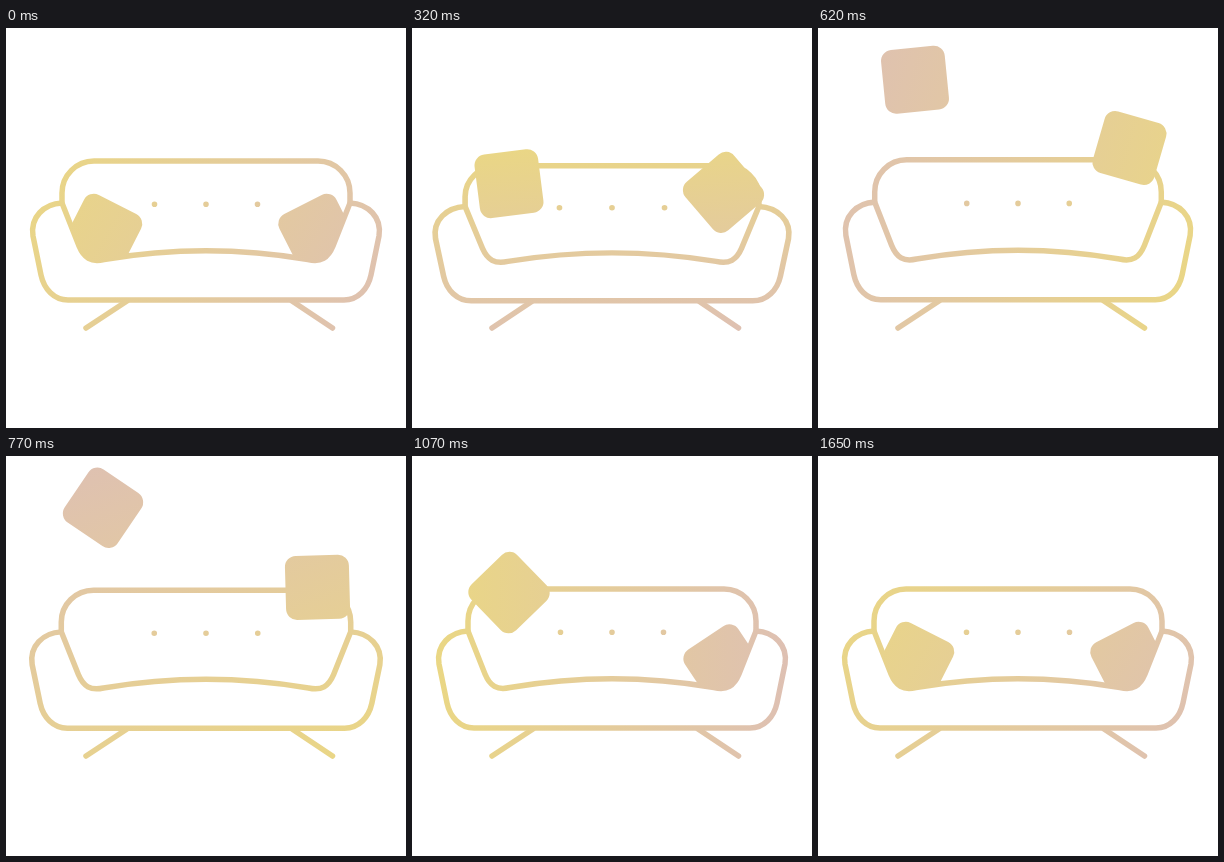
Animation of 400 by 400 pixels, one loop 1.67 s. Source, as an HTML page:

```html
<!DOCTYPE html>
<html lang="en">
<head>
<meta charset="utf-8">
<title>Sofa</title>
<style>
  html, body { margin: 0; width: 100%; height: 100%; overflow: hidden; background: #fff; }
  svg { display: block; width: 100%; height: 100%; }
</style>
</head>
<body>
<svg viewBox="0 0 400 400">
  <defs>
    <linearGradient id="tint" gradientUnits="userSpaceOnUse">
      <stop offset="0" stop-color="#ead784"/>
      <stop offset="1" stop-color="#dec0b3"/>
    </linearGradient>
    <mask id="shape" maskUnits="userSpaceOnUse" x="0" y="0" width="400" height="400">
      <g fill="none" stroke="#fff" stroke-width="5.5" stroke-linecap="round" stroke-linejoin="round">
        <path id="legs"/>
        <g class="sofa">
          <path d="M56 174V165A32 32 0 0 1 88 133H312A32 32 0 0 1 344 165V174"/>
          <path stroke-width="5.6" d="M148.5 176.3h0M200 176.3h0M251.5 176.3h0"/>
        </g>
        <g fill="#fff" stroke="none">
          <rect id="left" x="-32" y="-32" width="64" height="64" rx="11"/>
          <rect id="right" x="-32" y="-32" width="64" height="64" rx="11"/>
        </g>
        <path class="sofa" fill="#000" d="M56 175C38 176 24 189 27 208L35 247C38 261 48 272 62 272H338C352 272 362 261 365 247L373 208C376 189 362 176 344 175L327 218C322 230 315 234.5 302 231.5Q200 214 98 231.5C85 234.5 78 230 73 218Z"/>
      </g>
    </mask>
  </defs>
  <rect width="400" height="400" fill="url(#tint)" mask="url(#shape)"/>
</svg>
<script>
const LOOP = 1670, START = 70, FLOOR = 300, REST = 205;
const $ = id => document.getElementById(id);
const sofa = document.querySelectorAll('.sofa');
const tint = $('tint');

const span = (t, from, to) => Math.min(1, Math.max(0, (t - from) / (to - from)));
const cubic = u => u < 0.5 ? 4 * u ** 3 : 1 - 4 * (1 - u) ** 3;
const sine = u => (1 - Math.cos(Math.PI * u)) / 2;
const rad = deg => deg * Math.PI / 180;

const pillows = [
  { el: $('left'), x: 97, peak: 51.5, top: 669, fall: 717, land: 1148,
    angle: 27, turn: -270, still: 1285, sway: 2 },
  { el: $('right'), x: 311.5, peak: 120, top: 593, fall: 605, land: 930,
    angle: -27, turn: -90, still: 1182, sway: -2.5 }
];

// Sofa wobble that fades out
function squash(t) {
  const d = Math.max(0, t - 100);
  return 0.055 * (1 - span(d, 0, 970)) ** 2 * Math.sin(Math.PI * d / 280);
}

function pose(p, t) {
  const d = Math.max(0, t - p.land);
  const bounce = 9 * Math.exp(-d / 150) * Math.sin(Math.PI * d / 260);
  const lift = cubic(span(t, 57, p.top)) - span(t, p.fall, p.land) ** 3;
  return {
    y: REST - (REST - p.peak) * lift + bounce,
    angle: p.angle + p.turn * sine(span(t, 30, p.still)) + p.sway * bounce
  };
}

function paint(top, width, t) {
  const a = rad(30 + 360 * span(t, 170, 1150));
  const dx = -Math.cos(a), dy = -Math.sin(a);
  const cy = (top + 303) / 2;
  const half = Math.abs(dx) * width / 2 + Math.abs(dy) * (303 - top) / 2;
  const ends = { x1: 200 + dx * half, y1: cy + dy * half, x2: 200 - dx * half, y2: cy - dy * half };
  for (const k in ends) tint.setAttribute(k, ends[k]);
}

function draw(t) {
  if (t < START) t = 0;
  const e = squash(t), sx = 1 + e, sy = 1 - 1.4 * e;
  const px = x => 200 + (x - 200) * sx;
  const py = y => FLOOR + (y - FLOOR) * sy;
  for (const g of sofa)
    g.setAttribute('transform', `translate(200 ${FLOOR}) scale(${sx} ${sy}) translate(-200 ${-FLOOR})`);
  $('legs').setAttribute('d',
    `M80 300L${px(121)} ${py(273)}M326.5 300L${px(286)} ${py(273)}`);

  let top = py(130);
  for (const p of pillows) {
    const { y, angle } = pose(p, t), r = rad(angle);
    p.el.setAttribute('transform', `translate(${p.x} ${y}) rotate(${angle})`);
    top = Math.min(top, y - 11 - 21 * (Math.abs(Math.cos(r)) + Math.abs(Math.sin(r))));
  }
  paint(top, 352 * sx, t);
}

const begin = performance.now();
function tick() {
  draw((performance.now() - begin) % LOOP);
  requestAnimationFrame(tick);
}
tick();
</script>
</body>
</html>
```
